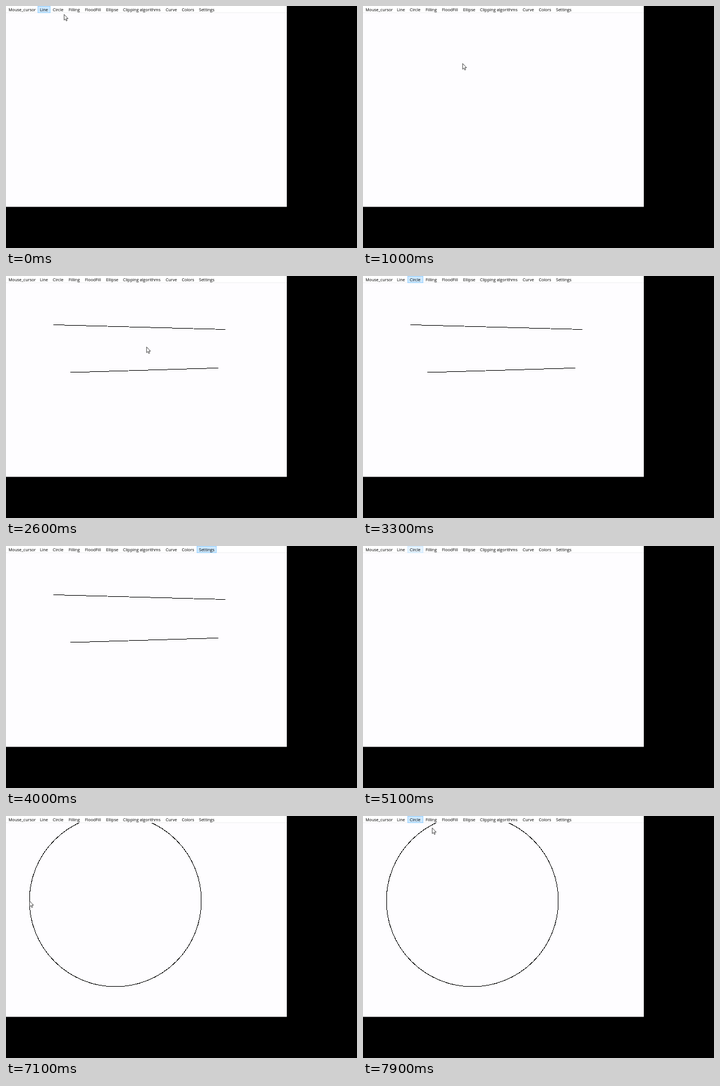
An HTML page for the animation above (8 s loop, 600 by 414 pixels).

```html
<!DOCTYPE html>
<html lang="en">
<head>
<meta charset="utf-8">
<title>Drawing program</title>
<style>
html, body { margin: 0; width: 100%; height: 100%; overflow: hidden; background: #000; }
svg { display: block; width: 600px; height: 414px; }
text { font: 7.1px "Open Sans", "Noto Sans", sans-serif; fill: #000; }

.ink { fill: none; stroke: #000; shape-rendering: crispEdges; }
.mark { stroke: #99d1ff; fill: #cce8ff; opacity: 0; }
.mark, .ink, #cursor { animation: 8s step-end infinite; }

#lineMark { animation-name: line-mark; }
#circleMark { animation-name: circle-mark; }
#settingsMark { animation-name: settings-mark; }
#upper { animation-name: upper; }
#lower { animation-name: lower; }
#ring { animation-name: ring; }
#cursor { animation-name: move, show; }

@keyframes line-mark { 0% { opacity: 1 } 5%, 100% { opacity: 0 } }
@keyframes circle-mark {
  0%, 42.5%, 72.5% { opacity: 0; fill: #cce8ff; stroke: #99d1ff }
  35%, 62.5%, 92.5% { opacity: 1; fill: #e5f3ff; stroke: #cce8ff }
  36.25%, 66.25%, 93.75%, 100% { opacity: 1; fill: #cce8ff; stroke: #99d1ff }
}
@keyframes settings-mark { 0%, 57.5%, 100% { opacity: 0 } 43.75% { opacity: 1 } }
@keyframes upper { 0%, 57.5%, 100% { opacity: 0 } 20% { opacity: 1 } }
@keyframes lower { 0%, 57.5%, 100% { opacity: 0 } 30% { opacity: 1 } }
@keyframes ring { 0% { opacity: 0 } 88.75%, 100% { opacity: 1 } }

/* The pointer is hidden while a menu is open. */
@keyframes show {
  0%, 56.25%, 72.5%, 97.5%, 100% { opacity: 1 }
  35%, 62.5%, 92.5% { opacity: 0 }
}
/* One step lasts 100 ms (1.25%). */
@keyframes move {
  0%, 3.75% { transform: translate(99px, 14px) }
  5% { transform: translate(130px, 22px); animation-timing-function: steps(4) }
  10% { transform: translate(276px, 84px) }
  11.25% { transform: translate(230px, 88px) }
  12.5% { transform: translate(170px, 98px); animation-timing-function: steps(2) }
  15% { transform: translate(82px, 83px) }
  16.25% { transform: translate(82px, 83px); animation-timing-function: steps(3) }
  20% { transform: translate(375px, 92px) }
  21.25% { transform: translate(468px, 140px) }
  22.5% { transform: translate(453px, 190px); animation-timing-function: steps(2) }
  25% { transform: translate(110px, 165px) }
  26.25% { transform: translate(110px, 165px); animation-timing-function: steps(3) }
  30% { transform: translate(363px, 157px) }
  31.25% { transform: translate(345px, 155px) }
  32.5% { transform: translate(240px, 121px) }
  33.75% { transform: translate(150px, 40px) }
  56.25% { transform: translate(439px, 47px); animation-timing-function: steps(4) }
  61.25% { transform: translate(100px, 14px) }
  72.5% { transform: translate(120px, 24px); animation-timing-function: steps(5) }
  78.75% { transform: translate(343px, 163px); animation-timing-function: steps(2) }
  81.25% { transform: translate(403px, 93px); animation-timing-function: steps(3) }
  85% { transform: translate(187px, 145px) }
  86.25% { transform: translate(187px, 145px); animation-timing-function: steps(2) }
  88.75% { transform: translate(40px, 145px) }
  90% { transform: translate(210px, 19px) }
  91.25% { transform: translate(110px, 14px) }
  97.5% { transform: translate(112px, 16px) }
  98.75%, 100% { transform: translate(118px, 20px) }
}
</style>
</head>
<body>
<svg viewBox="0 0 600 414">
  <rect width="600" height="414"/>
  <rect width="480" height="343.6" fill="#fefdff"/>

  <circle id="ring" class="ink" cx="187" cy="145" r="147"/>
  <path id="upper" class="ink" d="M81.5 83.5L375.5 91.5"/>
  <path id="lower" class="ink" d="M110 165L363 157.4"/>

  <rect width="480" height="11.5" fill="#fff"/>
  <rect y="11" width="480" height="1" fill="#f0f0f2"/>
  <rect id="lineMark" class="mark" x="54.5" y=".5" width="21" height="11"/>
  <rect id="circleMark" class="mark" x="76.5" y=".5" width="26" height="11"/>
  <rect id="settingsMark" class="mark" x="326.5" y=".5" width="33" height="11"/>
  <text y="8.6">
    <tspan x="4.2">Mouse_cursor</tspan>
    <tspan x="58">Line</tspan>
    <tspan x="80">Circle</tspan>
    <tspan x="107">Filling</tspan>
    <tspan x="135">FloodFill</tspan>
    <tspan x="171">Ellipse</tspan>
    <tspan x="200">Clipping algorithms</tspan>
    <tspan x="273">Curve</tspan>
    <tspan x="300.5">Colors</tspan>
    <tspan x="330">Settings</tspan>
  </text>

  <path id="cursor" d="M.3 .4V10.2L2.5 8.2L4 11.6L5.5 10.9L4.1 7.6H7.1Z" fill="#fff" stroke="#222" stroke-width=".8"/>
</svg>
</body>
</html>
```
